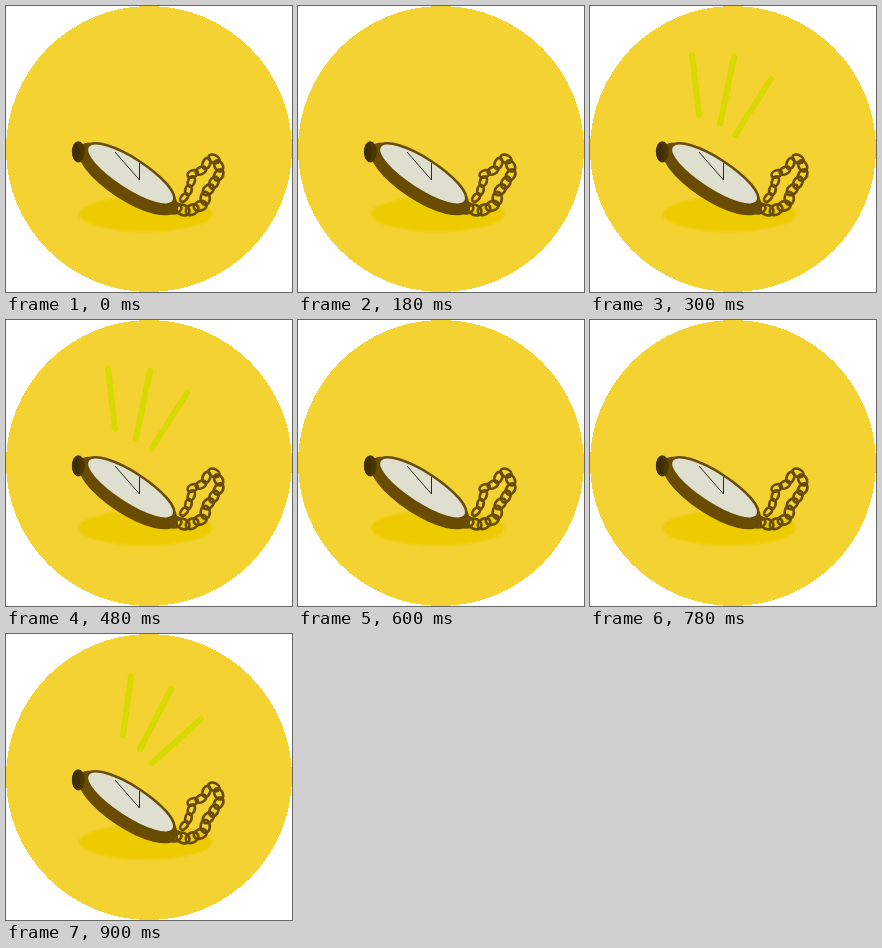
These frames come from a looping animation (286x286 px, 1200 ms). An HTML page:

```html
<!DOCTYPE html>
<html lang="en">
<head>
<meta charset="utf-8">
<title>Pocket watch</title>
<style>
html, body { margin: 0; width: 100%; height: 100%; overflow: hidden; background: #fff; }
svg { display: block; width: 100vw; height: 100vh; }
</style>
</head>
<body>
<svg viewBox="0 0 286 286">
  <circle cx="143" cy="143" r="143" fill="#f4d232" shape-rendering="crispEdges"/>
  <ellipse cx="139.7" cy="208" rx="66.5" ry="17.5" fill="#eccb00" style="filter: blur(.8px)"/>
  <path id="curve" fill="none" d="M168 202C180 206 196 206 200 190S214 178 213 163S204 151 197 162S183 163 185 172S180 186 178 192"/>
  <g id="chain" fill="none" stroke="#694c00" stroke-width="2.7"/>
  <ellipse rx="58" ry="21" transform="translate(121.8 173) rotate(33.3)" fill="#694c00"/>
  <ellipse rx="49.6" ry="14.3" transform="translate(124.6 168) rotate(32.8)" fill="#dfdfcf" stroke="#694c00" stroke-width="5" paint-order="stroke"/>
  <path d="M109 146L133.5 174V157" fill="none" stroke="#2b2b1c"/>
  <ellipse cx="72.3" cy="145.8" rx="6.4" ry="10.6" fill="#4a3700"/>
  <ellipse cx="70" cy="146" rx="3.8" ry="9" fill="#3d2d00"/>
  <g fill="none" stroke="#d8d900" stroke-width="6" stroke-linecap="round">
    <path class="rays" d="M102 49L109 109M144 51L130 118M181 73L145.5 128.5"/>
    <path class="rays" d="M125 42L117 101M165 55L134 115M195 85L146 129"/>
  </g>
</svg>
<script>
const curve = document.getElementById("curve");
const linkCount = 16;

// Links follow the curve and taper towards its free end
function link(i) {
  const t = i / (linkCount - 1);
  const at = t * curve.getTotalLength();
  const p = curve.getPointAtLength(at - 1), q = curve.getPointAtLength(at + 1);
  const angle = Math.atan2(q.y - p.y, q.x - p.x) * 180 / Math.PI + (i % 2 ? 20 : -20);
  return `<ellipse rx="${7 - 2 * t}" ry="${5.2 - 2.2 * t}"
    transform="translate(${(p.x + q.x) / 2} ${(p.y + q.y) / 2}) rotate(${angle})"/>`;
}
document.getElementById("chain").innerHTML =
  Array.from({ length: linkCount }, (_, i) => link(i)).join("");

const rays = document.querySelectorAll(".rays");
function draw() {
  const step = Math.floor(performance.now() % 1200 / 300);
  rays.forEach((ray, i) => ray.style.visibility = step === 2 * i + 1 ? "visible" : "hidden");
  requestAnimationFrame(draw);
}
draw();
</script>
</body>
</html>
```
